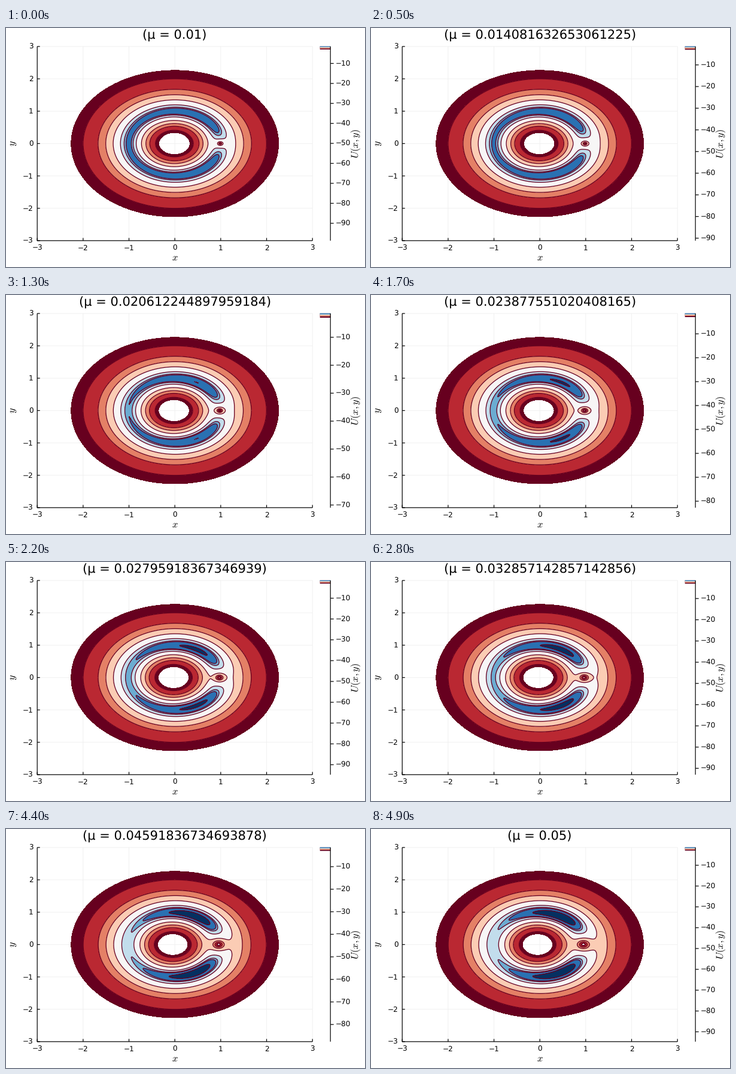
Write a matplotlib script that moves like this. It is 600 px wide and 400 px high and loops after 5000 ms.

```python
import matplotlib.pyplot as plt
import numpy as np
from matplotlib.animation import FuncAnimation

plt.rcParams["font.family"] = "DejaVu Sans"
plt.rcParams["mathtext.fontset"] = "cm"
plt.rcParams["text.hinting"] = "none"

FRAMES = 50
PT = 0.72  # points per pixel at 100 dpi
LEFT, RIGHT, TOP, BOTTOM = 52.2, 512.2, 30.9, 355.9
BAR_LEFT, BAR_RIGHT = 524.7, 542.2
LEVELS = [-3, -2.5, -2, -1.8, -1.65, -1.55, -1.52, -1.51, -1.49, -1.4]
CMAP = plt.get_cmap("RdBu")
BAND_COLORS = [CMAP(255 * i // 8) for i in range(9)]
LINE_COLOR = "#67001f"

grid = np.linspace(-3, 3, 300)
X, Y = np.meshgrid(grid, grid)


def px(x):
    return LEFT + (x + 3) / 6 * (RIGHT - LEFT)


def py(y):
    return BOTTOM - (y + 3) / 6 * (BOTTOM - TOP)


def mass_ratio(k):
    """Exactly rounded interpolation between 0.01 and 0.05."""
    scale, last = 2**59, FRAMES - 1
    lo, hi = int(0.01 * scale), int(0.05 * scale)
    return ((last - k) * lo + k * hi) / (last * scale)


def potential(mu):
    r1 = np.hypot(X + mu, Y)
    r2 = np.hypot(X - 1 + mu, Y)
    return -(1 - mu) / r1 - mu / r2 - (X**2 + Y**2) / 2


fig = plt.figure(figsize=(6, 4), dpi=100, facecolor="white")
ax = fig.add_axes([0, 0, 1, 1])


def stage():
    ax.set_xlim(0, 600)
    ax.set_ylim(400, 0)
    ax.axis("off")


def line(xs, ys, color="black", width=1.2, z=4):
    return ax.plot(xs, ys, color=color, lw=width * PT, zorder=z,
                   solid_capstyle="butt", snap=False)[0]


def text(x, y, s, size=12, ha="center", va="baseline", **kw):
    return ax.text(x, y, s, fontsize=size * PT, ha=ha, va=va, zorder=5, **kw)


def number(n):
    return str(n).replace("-", "\u2212")


def draw_axes():
    for v in range(-3, 4):
        x, y = px(v), py(v)
        line([x, x], [TOP, BOTTOM], "#eeeeee", 0.8, 0.5)
        line([LEFT, RIGHT], [y, y], "#eeeeee", 0.8, 0.5)
        line([x, x], [BOTTOM, BOTTOM - 4.5])
        line([LEFT, LEFT + 4.5], [y, y])
        text(x, 372, number(v))
        text(45.8, y + 4, number(v), ha="right")
    line([LEFT, LEFT], [TOP, BOTTOM + 0.5])
    line([LEFT, RIGHT], [BOTTOM, BOTTOM])
    line([BAR_RIGHT, BAR_RIGHT], [TOP, BOTTOM])
    text(282, 384, "$x$", 16.5, va="center")
    text(12, 193, "$y$", 16.5, va="center", rotation=90)
    text(584.5, 193.5, "$U(x,y)$", 16.5, va="center", rotation=90)


def draw_colorbar(zmin, zmax):
    def bar_y(z):
        return TOP + (BOTTOM - TOP) * (zmax - z) / (zmax - zmin)

    artists = []
    for level in LEVELS:
        if level < zmax:
            color = CMAP((level - LEVELS[0]) / (LEVELS[-1] - LEVELS[0]))
            artists.append(ax.add_patch(plt.Rectangle(
                (BAR_LEFT, TOP), BAR_RIGHT - BAR_LEFT, bar_y(level) - TOP,
                fc=color, lw=0, snap=False, zorder=2)))
    for z in range(-10, int(zmin) - 1, -10):
        if z >= zmin:
            y = bar_y(z)
            artists.append(line([BAR_RIGHT, BAR_RIGHT + 5.5], [y, y]))
            artists.append(text(550.7, y + 4, number(z), ha="left"))
    return artists


moving = []


def update(k):
    while moving:
        moving.pop().remove()
    mu = mass_ratio(k)
    u = potential(mu)
    xs, ys = px(X), py(Y)
    moving.append(ax.contourf(xs, ys, u, LEVELS, colors=BAND_COLORS, zorder=1))
    moving.append(ax.contour(xs, ys, u, LEVELS[1:], colors=LINE_COLOR,
                             linestyles="solid", linewidths=1.3 * PT, zorder=2))
    moving.extend(draw_colorbar(u.min(), u.max()))
    moving.append(text(282.2, 18.4, f"(\u03bc = {mu})", 21))
    stage()
    return []


draw_axes()
anim = FuncAnimation(fig, update, frames=FRAMES, init_func=lambda: update(0),
                     interval=100, repeat=True, repeat_delay=0, blit=False)
plt.show()
```
